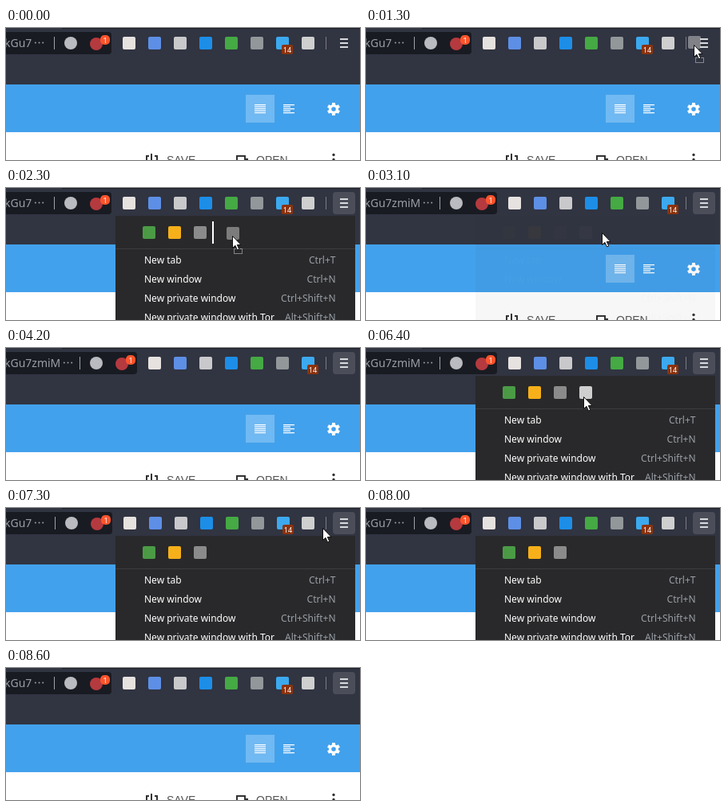
Recreate the animation shown at these times as an HTML page with a canvas. Size 443x166 px, loop 8700 ms.

```html
<!DOCTYPE html>
<html lang="en">
<head>
<meta charset="utf-8">
<title>Toolbar icon drag</title>
<style>
html, body { margin: 0; width: 100%; height: 100%; overflow: hidden; background: #fff; }
canvas { display: block; width: 443px; height: 166px; }
</style>
</head>
<body>
<canvas id="stage" width="443" height="166"></canvas>
<script>
const c = document.getElementById('stage').getContext('2d');
const LOOP = 8700, STEP = 100, GAP = 32;
const UI = '"Noto Sans", "Open Sans", sans-serif';
const TOOL = '#cfcfcf', BLUE = '#42a1ec', INK = '#333';
const ARROW = new Path2D('M0 0V15L3.4 11.8 6 17.5 8.3 16.5 5.8 11H10.5Z');

const BAR_ICONS = ['#e6e2df', '#5d8fe6', '#c9c9cb', '#1c8ee8', '#45a944', '#92979a', '#3ca9ef'];
const MENU_ICONS = ['#4b9b45', '#f6b01a', '#8b8b8b'];
const MENU_ROWS = [
  ['New tab', 'Ctrl+T'],
  ['New window', 'Ctrl+N'],
  ['New private window', 'Ctrl+Shift+N'],
  ['New private window with Tor', 'Alt+Shift+N']
];

// Pointer moves: start, end, and where it comes to rest.
const HOME = [410, 40];
const MOVES = [
  [200, 400, 370, 31],
  [500, 800, 378, 20],
  [800, 1300, 410, 21],
  [1600, 2300, 283, 60],
  [2700, 3100, 295, 56],
  [3100, 3600, 344, 45],
  [3600, 3900, 426, 36],
  [4000, 4200, 446, 33],
  [4900, 5200, 426, 27],
  [5500, 6400, 272, 61],
  [6400, 6800, 396, 25],
  [7600, 8000, 446, 21]
];

const within = (t, a, b) => t >= a && t < b;
const progress = (t, a, b) => Math.min(1, Math.max(0, (t - a) / (b - a)));
const easeOut = u => 1 - (1 - u) ** 3;
const settle = (t, from) => easeOut(progress(t, from, from + 300));

function rect(x, y, w, h, color) {
  c.fillStyle = color;
  c.fillRect(x, y, w, h);
}

function box(x, y, w, h, r, color) {
  c.fillStyle = color;
  c.beginPath();
  c.roundRect(x, y, w, h, r);
  c.fill();
}

const disc = (x, y, r, color) => box(x - r, y - r, 2 * r, 2 * r, r, color);
const tile = (x, y, color) => box(x - 8, y - 8, 16, 16, 2, color);

function text(s, x, y, font, color, align = 'left') {
  c.font = font;
  c.fillStyle = color;
  c.textAlign = align;
  c.fillText(s, x, y);
}

function pointerAt(t) {
  let [x, y] = HOME;
  for (const [from, to, endX, endY] of MOVES) {
    const u = progress(t, from, to);
    x += (endX - x) * u;
    y += (endY - y) * u;
  }
  return [Math.round(x), Math.round(y)];
}

function gear(x, y) {
  c.save();
  c.translate(x, y);
  for (let i = 0; i < 6; i++) {
    rect(-2, -8, 4, 5, '#fff');
    c.rotate(Math.PI / 3);
  }
  c.restore();
  disc(x, y, 6, '#fff');
  disc(x, y, 2.8, BLUE);
}

function page() {
  rect(0, 0, 443, 166, '#fff');
  rect(0, 71, 443, 60, BLUE);
  rect(300, 84, 36, 35, '#71b9f2');
  for (let i = 0; i < 5; i++) {
    const y = 96 + i * 2.5;
    rect(311, y, 14, 1.2, '#fff');
    rect(347, y, i % 2 ? 9 : 14, 1.3, '#fff');
  }
  gear(410, 102);

  c.strokeStyle = INK;
  c.lineWidth = 2;
  c.stroke(new Path2D('M182 158V166M179 161H176V166M186 161H189V166M289 166V161H299V165H303'));
  const font = '14px "Liberation Sans", Arial, sans-serif';
  text('SAVE', 201, 171, font, '#555');
  text('OPEN', 313, 171, font, '#555');
  for (const y of [159.5, 165.5]) disc(410, y, 1.7, INK);
}

function addressBar(dx) {
  box(-10, 5, 142 + dx, 28, 4, '#191b22');
  const color = '#9c9ea6';
  const url = 'kGu7zmiM'.slice(0, 4 + Math.round(dx / 8));
  text(url, -2, 24, '14px ' + UI, color);
  const end = c.measureText(url).width;
  for (let i = 0; i < 3; i++) disc(end + 2.5 + i * 4.7, 18.5, 1, color);
  rect(60 + dx, 11, 1, 16, '#a0a2a9');
  disc(81 + dx, 19, 8, '#b9bbc0');
  disc(113 + dx, 20, 8, '#b53a3f');
  box(118 + dx, 9, 12, 12, 5, '#fb542b');
  text('1', 124 + dx, 18.5, '9px ' + UI, '#fff', 'center');
}

function toolbar(dx, active) {
  rect(0, 0, 443, 71, '#313441');
  rect(70, 0, 373, 1, '#1b1d24');
  addressBar(dx);
  BAR_ICONS.forEach((color, i) => tile(154 + dx + i * GAP, 19, color));
  box(345 + dx, 21, 14, 12, 2, '#8b330d');
  text('14', 352 + dx, 30.5, '9px ' + UI, '#fff', 'center');
  if (dx < GAP / 2) tile(378, 19, TOOL);
  rect(400, 11, 1, 16, '#7b7d87');
  if (active) box(409, 5, 28, 28, 4, '#4b4e59');
  for (let y = 13; y < 25; y += 5) rect(418, y, 10, 2, '#d8d9dc');
}

function menu(docked, alpha) {
  c.globalAlpha = alpha;
  rect(137, 35, 300, 131, '#29292b');
  const icons = docked ? [...MENU_ICONS, TOOL] : MENU_ICONS;
  icons.forEach((color, i) => tile(179 + i * GAP, 56, color));
  rect(137, 76, 300, 1, '#3d3d40');
  MENU_ROWS.forEach(([name, keys], i) => {
    const y = 95 + i * 24;
    text(name, 173, y, '12px ' + UI, '#fff');
    text(keys, 412.5, y, '12px ' + UI, '#9aa0a6', 'right');
  });
  c.globalAlpha = 1;
}

function pointer(x, y, dragging) {
  c.lineWidth = 1;
  if (dragging) {
    c.globalAlpha = 0.5;
    tile(x + 1, y - 3, TOOL);
    c.globalAlpha = 1;
    c.strokeStyle = '#ddd';
    c.setLineDash([1, 1]);
    c.strokeRect(x + 2.5, y + 16.5, 10, 6);
    c.setLineDash([]);
  }
  c.save();
  c.translate(x + 0.5, y + 0.5);
  c.fillStyle = '#fff';
  c.fill(ARROW);
  c.strokeStyle = '#111';
  c.stroke(ARROW);
  c.restore();
}

function menuAlpha(t) {
  if (within(t, 1700, 3200)) return 1 - settle(t, 2900);
  return within(t, 5400, 8600) ? 1 : 0;
}

function draw(t) {
  const dx = Math.round(GAP * (settle(t, 2700) - settle(t, 7100)));
  page();
  toolbar(dx, t >= 1700);
  menu(within(t, 2800, 7200), menuAlpha(t));
  if (within(t, 2200, 2800)) rect(258, 42, 2, 28, '#fff');
  if (within(t, 6800, 7200)) rect(394, 5, 2, 28, '#fff');
  const dragging = within(t, 900, 2800) || within(t, 6500, 7200);
  if (t >= 200) pointer(...pointerAt(t), dragging);
}

const start = performance.now();
function frame() {
  const t = (performance.now() - start) % LOOP;
  draw(Math.floor(t / STEP) * STEP);
  requestAnimationFrame(frame);
}
frame();
</script>
</body>
</html>
```
